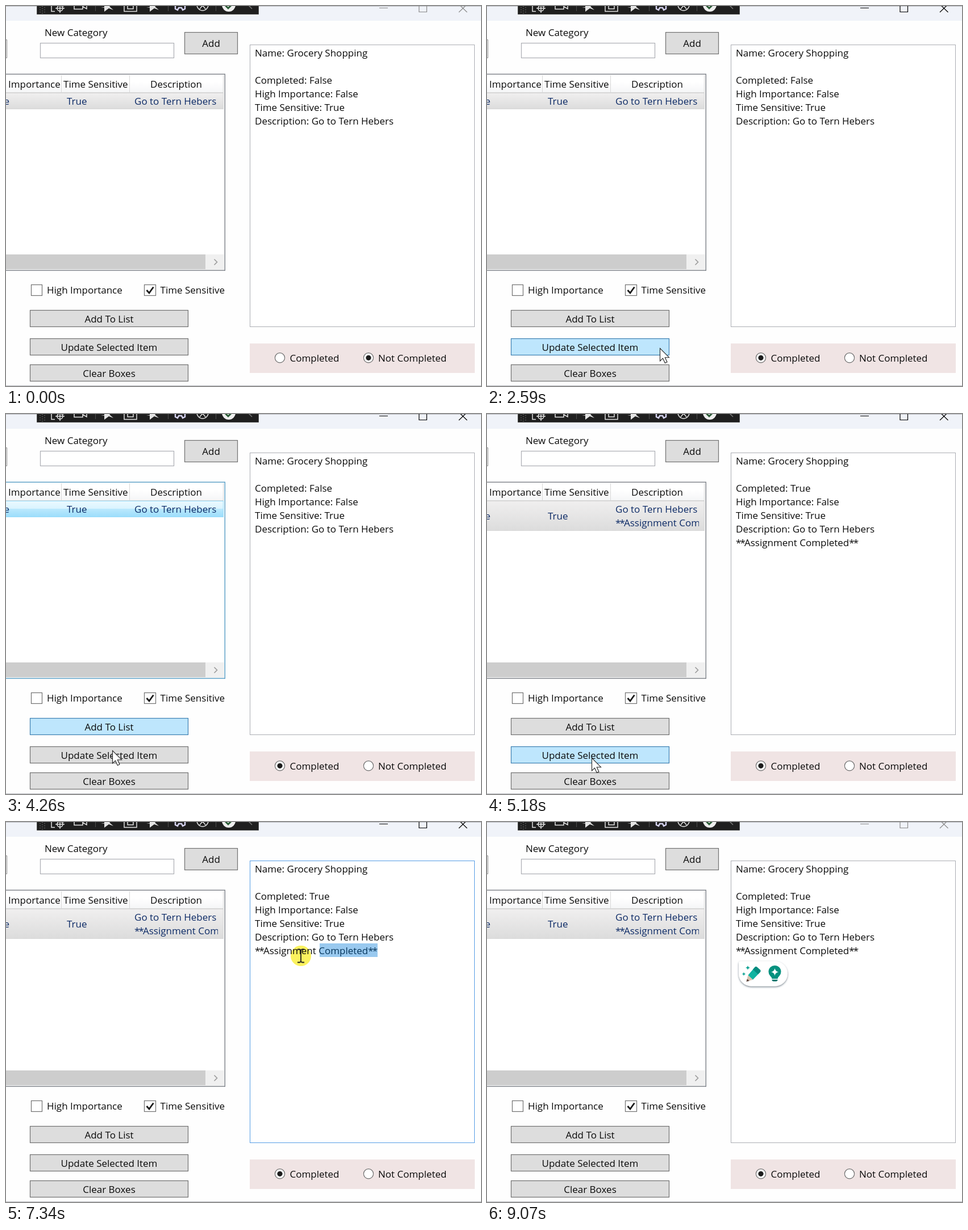
An HTML page that plays this animation: 836x670 px, repeating every 9120 ms.

```html
<!DOCTYPE html>
<html lang="en">
<head>
<meta charset="utf-8">
<title>Task list</title>
<style>
html, body { margin: 0; width: 100%; height: 100%; overflow: hidden; background: #fff; }
svg { display: block; width: 836px; height: 670px; }
text { font: 17px "Open Sans", "Noto Sans", sans-serif; fill: #0a0a0a; white-space: pre; }
.mid { text-anchor: middle; }
.row text { fill: #0c2a66; }
.stars { letter-spacing: -1.9px; }
.btn { fill: #ddd; stroke: #707070; stroke-width: 1.2; }
.btn.hover { fill: #bee6fd; stroke: #3c7fb1; }
.btn.press { fill: #c4e5f6; stroke: #2c628b; }
.box { fill: #fff; stroke: #707070; stroke-width: 1.2; }
.ring { fill: #fff; stroke: #707070; stroke-width: 1.2; }
.ring.hover { fill: #f3f9ff; stroke: #5593ff; }
.line { fill: none; stroke: #d8d8d8; }
.icon { fill: none; stroke: #e4e4e4; stroke-width: 1.5; }
#glow { fill: #fbf25e; mix-blend-mode: multiply; }
</style>
</head>
<body>
<svg viewBox="0 0 836 670">
  <defs>
    <linearGradient id="grey" x2="0" y2="1"><stop stop-color="#f0efef"/><stop offset="1" stop-color="#dcdcdc"/></linearGradient>
    <linearGradient id="blue" x2="0" y2="1"><stop stop-color="#d9f4ff"/><stop offset="1" stop-color="#9bddfb"/></linearGradient>
    <linearGradient id="head" x2="0" y2="1"><stop offset=".4" stop-color="#fff"/><stop offset="1" stop-color="#f5f6f7"/></linearGradient>
    <filter id="soft" x="-20%" y="-20%" width="140%" height="150%"><feDropShadow dx="0" dy="1.5" stdDeviation="1.6" flood-color="#345" flood-opacity=".65"/></filter>
    <clipPath id="cell"><rect x="220" y="150" width="153" height="60"/></clipPath>
    <path id="star" d="M0-4Q.6-.6 4 0Q.6.6 0 4Q-.6.6-4 0Q-.6-.6 0-4Z"/>
    <path id="pick" d="M-11 2H-5L-5-4H12L4 1L11 7L3 4L-5 10V3Z"/>
  </defs>

  <rect width="836" height="670" fill="#fefefe"/>
  <rect width="836" height="26" fill="#f0f3f9"/>
  <path d="M0 .5H836M0 669.5H836" stroke="#b9bbc0"/>
  <path id="chrome" fill="none" stroke-width="1.2" d="M657 3.5H672M727-3V10.5H740.5V-3M797-3L811.500 11M811.500-3L797 11"/>

  <!-- toolbar -->
  <path d="M54.500-1V14.500H444.500V-1Z" fill="#1f1f1f" stroke="#4c4c4c"/>
  <path d="M60 2V14M64 0V14M68 2V14" stroke="#777" stroke-width="1.300" stroke-dasharray="1.300 2.700"/>
  <path d="M157.500 0V9M285.500 0V9M369.500 0V9" stroke="#4d4d4d"/>
  <g class="icon">
    <path d="M80-1V9.500H86M101-1V1"/>
    <circle cx="95" cy="4" r="5"/><path d="M95-4V12M87 4H103"/>
    <path d="M120-1V5.500H135V-1M135 1L142 5V-1"/>
    <path d="M208-1V9.500H230V-1M214-1V5H224V-1"/>
    <circle cx="346" cy="-2" r="10"/><path d="M341 5L346-1L351 5M346-4V-1"/>
    <path d="M427-1L433 5" stroke="#777"/>
  </g>
  <use href="#pick" x="178" fill="#e4e4e4"/>
  <use href="#pick" x="258" fill="#e4e4e4"/>
  <path d="M298-1V5L302 7L304 3H309L311 7L315 5V-1" fill="none" stroke="#d5d3f0" stroke-width="2.500"/>
  <circle cx="392" cy="-2" r="12" fill="#eee"/>
  <path d="M386-1L391 4L398-3" fill="none" stroke="#285a34" stroke-width="3"/>

  <!-- category -->
  <path d="M-1 59.500H1.500V91.500H-1" fill="none" stroke="#858585"/>
  <text x="68" y="53">New Category</text>
  <rect class="box" x="60.500" y="65.500" width="235" height="26" style="stroke:#abadb3"/>
  <rect class="btn" x="314.500" y="46.500" width="93" height="38"/>
  <text class="mid" x="361" y="72">Add</text>

  <!-- list -->
  <rect id="list" x="-4.500" y="120.200" width="389.800" height="346" fill="#fff" stroke-width="1.400"/>
  <rect y="122" width="383" height="30" fill="url(#head)"/>
  <path class="line" d="M0 152.500H383M97.500 122V152M217.500 122V152M382.500 122V152"/>
  <text x="4" y="144">Importance</text>
  <text x="101" y="144">Time Sensitive</text>
  <text class="mid" x="299.500" y="144">Description</text>
  <g class="row">
    <rect id="row" x="-4" y="153.500" width="386.500"/>
    <rect id="shine" y="154" width="382" height="13" fill="#fff" opacity=".45"/>
    <g id="cells">
      <text x="6" y="174" text-anchor="end">False</text>
      <text x="107" y="174">True</text>
    </g>
    <g clip-path="url(#cell)">
      <text x="226" y="174">Go to Tern Hebers</text>
      <text class="done" x="226" y="198"><tspan class="stars">**</tspan>Assignment Completed</text>
    </g>
  </g>
  <rect y="438" width="384" height="27" fill="#f0f0f0"/>
  <rect y="438" width="351" height="26" fill="#cdcdcd"/>
  <path d="M366.500 446.500L371.500 451.500L366.500 456.500" fill="none" stroke="#9b9b9b" stroke-width="1.600"/>

  <!-- options -->
  <rect class="box" x="44.500" y="491.500" width="19" height="19"/>
  <text x="72" y="507">High Importance</text>
  <rect class="box" x="243.500" y="491.500" width="20" height="19"/>
  <path d="M247.500 501L252 506L259.500 495.500" fill="none" stroke="#1c1c1c" stroke-width="2.800"/>
  <text x="271.500" y="507">Time Sensitive</text>
  <rect class="btn" id="add" x="42.500" y="536.500" width="278" height="29"/>
  <text class="mid" x="181.500" y="558">Add To List</text>
  <rect class="btn" id="update" x="42.500" y="586.500" width="278" height="29"/>
  <text class="mid" x="181.500" y="608">Update Selected Item</text>
  <rect class="btn" x="42.500" y="632.500" width="278" height="29"/>
  <text class="mid" x="181.500" y="654">Clear Boxes</text>

  <!-- details -->
  <rect id="pane" x="429.500" y="68.500" width="395" height="497" fill="#fff"/>
  <text x="438" y="89">Name: Grocery Shopping</text>
  <text x="438" y="137" id="status"></text>
  <text x="438" y="161">High Importance: False</text>
  <text x="438" y="185">Time Sensitive: True</text>
  <text x="438" y="209">Description: Go to Tern Hebers</text>
  <text class="done" x="438" y="233"><tspan class="stars">**</tspan>Assignment Completed<tspan class="stars">**</tspan></text>
  <rect id="mark" y="214" height="24" fill="#0078d7" opacity=".4"/>

  <rect x="429" y="595" width="396" height="52" fill="#f0e4e4"/>
  <circle class="ring" id="yes" cx="482" cy="620.300" r="8.600"/>
  <circle class="ring" id="no" cx="638" cy="620.300" r="8.600"/>
  <circle id="dot" cy="620.300" r="4.600" fill="#1c1c1c"/>
  <text x="499.500" y="627">Completed</text>
  <text x="655" y="627">Not Completed</text>

  <!-- writing helper -->
  <g id="popup">
    <path d="M447 245.500H507A22 22 0 0 1 507 289.500H465A22 22 0 0 1 443 267.500V249.500Q443 245.500 447 245.500Z" fill="#fff" filter="url(#soft)"/>
    <path d="M459.500 270L468 278L456.500 281.500Z" fill="#d9c3b0"/>
    <path d="M457.800 276.800L462 280L456.500 281.500Z" fill="#5d4740"/>
    <path d="M459.500 270L471 256.500Q473 254 475.500 256L480.500 260.500Q482.500 262.500 480.500 265L468 278Z" fill="#10b3a0"/>
    <path d="M468 260L477 268.500L480.500 265Q482.500 262.500 480.500 260.500L475.500 256Q473 254 471 256.500Z" fill="#068c80"/>
    <g fill="#10a394">
      <use href="#star" x="459" y="257"/>
      <use href="#star" x="452" y="268" transform="translate(90.400 53.600) scale(.8)"/>
      <path d="M501.500 276.500Q501 273.500 498.500 271.500A11 11 0 1 1 514.500 271.500Q512 273.500 511.500 276.500Z" fill="#05917f"/>
      <path d="M501.500 278H511.500V279Q511 281 508.500 281H504.500Q502 281 501.500 279Z" fill="#05756c"/>
    </g>
    <use href="#star" fill="#fff" transform="translate(506.500 264.500) scale(1.600)"/>
  </g>

  <circle id="glow" r="18"/>
  <path id="arrow" d="M.5.5V23L5.500 18.200L9.300 26.500L13 24.800L9.300 16.700H16.500Z" fill="#fff" stroke="#222" stroke-width="1.100"/>
  <path id="beam" d="M-6-11.500H-2L0-10L2-11.500H6M0-10V10M-6 11.500H-2L0 10L2 11.500H6" fill="none" stroke="#222" stroke-width="1.800"/>
</svg>
<script>
const LOOP = 9120;
const $ = id => document.getElementById(id);

// Pointer strokes: start, end, steps, then waypoints [time, x, y]
const strokes = [
  [610, 1210, 9, [[610, 692, 655], [760, 655, 632], [910, 605, 612], [1060, 560, 606], [1210, 541, 624]]],
  [1980, 2880, 13, [[1905, 541, 624], [2205, 455, 617], [2580, 304, 603], [2805, 268, 147], [2880, 255, 159]]],
  [3350, 3420, 2, [[3350, 255, 156], [3420, 255, 153]]],
  [3650, 4410, 11, [[3574, 255, 153], [3954, 228, 340], [4258, 187, 593], [4410, 179, 621]]],
  [4650, 4800, 3, [[4650, 182, 612], [4725, 184, 606]]],
  [5580, 6250, 10, [[5506, 184, 606], [5729, 290, 597], [5878, 363, 565], [6101, 600, 340], [6250, 686, 258]]],
  [6400, 6640, 4, [[6320, 686, 258], [6640, 653, 240]]],
  [6870, 7650, 11, [[7026, 653, 240], [7338, 519, 236], [7650, 445, 233]]],
  [8040, 8750, 10, [[7961, 445, 233], [8276, 520, 320], [8513, 645, 500], [8671, 742, 655], [8750, 760, 700]]]
];

// State changes: each entry overrides the earlier ones
const events = [
  [0, { chrome: '#8a8a8a', list: '#7c8087', pane: '#abadb3', row: 'grey', add: '', update: '',
        yes: '', no: '', done: false, pick: 638, glow: false, mark: 654, popup: false }],
  [80, { chrome: '#929292' }],
  [140, { chrome: '#999' }],
  [685, { no: 'hover' }],
  [910, { no: '' }],
  [1060, { yes: 'hover' }],
  [1540, { chrome: '#000', glow: true }],
  [1680, { pick: 482 }],
  [1750, { glow: false }],
  [2205, { yes: '' }],
  [2580, { update: 'hover' }],
  [2655, { update: '' }],
  [2805, { row: 'blue' }],
  [2960, { glow: true }],
  [3033, { list: '#569dc5' }],
  [3180, { glow: false }],
  [4182, { add: 'hover' }],
  [4334, { add: '', update: 'hover', row: 'grey', list: '#7c8087' }],
  [4650, { glow: true }],
  [4725, { update: 'press' }],
  [5030, { update: 'hover', glow: false }],
  [5105, { done: true }],
  [5803, { update: '' }],
  [5952, { pane: '#7eb4ea' }],
  [6870, { glow: true, pane: '#569de5' }],
  [7104, { mark: 638 }],
  [7182, { mark: 600 }],
  [7260, { mark: 552 }],
  [7416, { mark: 453 }],
  [7572, { mark: 438 }],
  [7810, { glow: false }],
  [8356, { popup: true }],
  [9070, { chrome: '#8a8a8a', pane: '#abadb3', mark: 654 }]
];

function along(points, t) {
  const i = points.findIndex(p => p[0] > t);
  if (i === 0) return points[0].slice(1);
  if (i < 0) return points[points.length - 1].slice(1);
  const [a, b] = [points[i - 1], points[i]];
  const k = (t - a[0]) / (b[0] - a[0]);
  return [a[1] + (b[1] - a[1]) * k, a[2] + (b[2] - a[2]) * k].map(Math.round);
}

function pointer(t) {
  const stroke = strokes.filter(s => s[0] <= t).pop();
  if (!stroke) return [0, 999];
  const [start, end, steps, points] = stroke;
  const gap = (end - start) / (steps - 1);
  const n = Math.min(steps - 1, Math.floor((t - start) / gap + 1e-6));
  return along(points, start + n * gap);
}

const show = (el, on) => { el.style.display = on ? '' : 'none'; };
const set = (id, attrs) => {
  for (const k in attrs) $(id).setAttribute(k, attrs[k]);
};
const lines = document.querySelectorAll('.done');

function render(t) {
  const s = Object.assign({}, ...events.filter(e => e[0] <= t).map(e => e[1]));
  for (const id of ['chrome', 'list', 'pane']) set(id, { stroke: s[id] });
  for (const id of ['add', 'update']) set(id, { class: 'btn ' + s[id] });
  for (const id of ['yes', 'no']) set(id, { class: 'ring ' + s[id] });
  set('row', {
    height: s.done ? 52 : 28,
    fill: `url(#${s.row})`,
    stroke: s.row === 'blue' ? '#98ddfb' : '#d6d6d6'
  });
  show($('shine'), s.row === 'blue');
  set('cells', { transform: `translate(0 ${s.done ? 12 : 0})` });
  lines.forEach(el => show(el, s.done));
  $('status').textContent = 'Completed: ' + (s.done ? 'True' : 'False');
  set('dot', { cx: s.pick });
  set('mark', { x: s.mark, width: 654 - s.mark });
  show($('popup'), s.popup);

  const [x, y] = pointer(t);
  const text = x > 429 && x < 825 && y > 68 && y < 566;
  for (const id of ['arrow', 'beam', 'glow']) set(id, { transform: `translate(${x} ${y})` });
  show($('arrow'), !text);
  show($('beam'), text);
  show($('glow'), s.glow);
}

const begin = performance.now();
function frame() {
  render((performance.now() - begin) % LOOP);
  requestAnimationFrame(frame);
}
frame();
</script>
</body>
</html>
```
